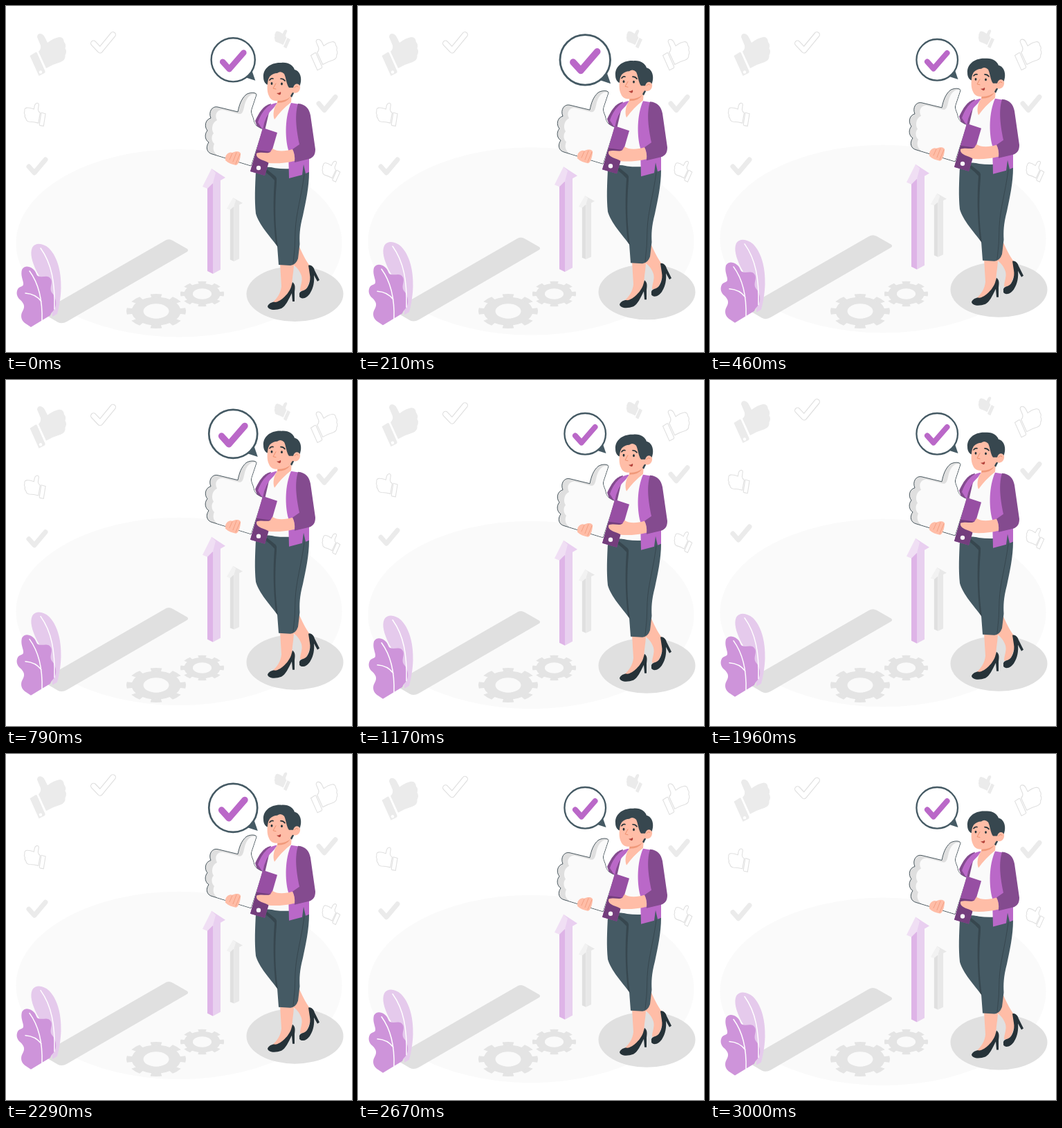
Write an HTML page that moves like this. It is 500 px wide and 500 px high and loops after 3.04 s.

```html
<!DOCTYPE html>
<html lang="en">
<head>
<meta charset="utf-8">
<style>
html, body { margin: 0; height: 100%; overflow: hidden; background: #fff; }
svg { display: block; width: 100vw; height: 100vh; }
.skin { fill: #ffbda7; }
.dark { fill: #263238; }
.slate { fill: #37474f; }
.violet { fill: #ba68c8; }
.plum { fill: #844b8f; }
.line { fill: none; stroke-linecap: round; stroke-linejoin: round; }
.solid { fill: #ebebeb; stroke: none; }
.hollow { fill: #fff; stroke: #e0e0e0; stroke-width: 1.1; }
.lilac { --left: #deb4e7; --right: #e8d0ef; --back: #e9cff0; --front: #f0dff4; }
.grey { --left: #e0e0e0; --right: #e8e8e8; --back: #e8e8e8; --front: #f2f2f2; }
</style>
</head>
<body>
<svg viewBox="0 0 500 500">
  <defs>
    <g id="thumb">
      <path vector-effect="non-scaling-stroke" d="M-15.500-25C-15.500-32-7.500-31-4.500-25L-.5-17Q9-24 16-25Q22.500-26 23.500-18Q27-14 25-9Q28-4 25 1Q26 8 18.500 11Q8 14-2.500 20L-13.500-4Q-9.500-8-10.500-13Z"/>
      <path vector-effect="non-scaling-stroke" d="M-26 2L-18-3Q-16.500-4-15.500-2L-4 24Q-3.500 26-5 27L-13 31Z"/>
    </g>
    <g id="gear" fill="none" stroke="#e4e4e4">
      <circle r="27" stroke-width="17"/>
      <circle r="38.500" stroke-width="9" pathLength="16" stroke-dasharray="1 1" stroke-dashoffset=".5"/>
    </g>
    <g id="arrow">
      <path fill="var(--left)" d="M291 260L299 256V387L291 383Z"/>
      <path fill="var(--right)" d="M299 256L310 250V381L299 387Z"/>
      <path fill="var(--back)" d="M297 235L317 248L310 252L299 256Z"/>
      <path fill="var(--front)" d="M297 235L303 241L299 256L291 264L284 261Z"/>
    </g>
  </defs>

  <g class="bob">
    <ellipse cx="250" cy="342.700" rx="235.500" ry="135.700" fill="#fafafa"/>
  </g>

  <g id="ambient">
    <g class="solid">
      <use href="#thumb" transform="translate(60.500 70)"/>
      <use href="#thumb" transform="translate(399.500 47.500) scale(-.44 .44)"/>
      <circle cx="50" cy="95.500" r="2.200" fill="#fff"/>
    </g>
    <g class="hollow">
      <use href="#thumb" transform="translate(459.500 70) scale(.73)"/>
      <use href="#thumb" transform="translate(470 239) scale(-.49 .49)"/>
      <use href="#thumb" transform="translate(42.500 158.500) rotate(-15) scale(-.57 .57)"/>
    </g>
    <g class="line">
      <path d="M126.500 54L136 64L154.500 41.500" stroke="#e0e0e0" stroke-width="9"/>
      <path d="M126.500 54L136 64L154.500 41.500" stroke="#fff" stroke-width="6.600"/>
      <path d="M33 232L41 241L57 222M452 141L460 150.500L476 131.500" stroke="#ebebeb" stroke-width="7"/>
    </g>
  </g>

  <use href="#gear" transform="translate(217 441) scale(1 .58)"/>
  <use href="#gear" transform="translate(283.500 416) scale(.735 .425)"/>

  <g id="bubble">
    <path fill="#455a64" d="M346 102L354 93L358.500 106Z"/>
    <circle cx="328.200" cy="77.800" r="29.800" fill="#fff" stroke="#455a64" stroke-width="2.300"/>
    <path class="line" d="M314 80.500L323 90.500L342.500 68" stroke="#ba68c8" stroke-width="8"/>
  </g>

  <g class="bob">
    <ellipse cx="417.500" cy="416" rx="70" ry="40" fill="#e0e0e0"/>
    <path fill="#e0e0e0" d="M58 438L229 339.500Q235 335.500 241 339L262 351Q264 353 262 355L88 456Q81 460 75 457L58 447Z"/>

    <!-- plant -->
    <path fill="#e5caec" d="M67 449C69 420 50 395 44 383C38 370 34 358 38 349C43 341 54 343 62 350C76 364 80 388 79.500 408C79 425 76 437 74 445Z"/>
    <path fill="#ce94da" d="M36 464L27 458C21 453 21 446 24 441C28 434 26 430 21 425C16 421 14 415 17 409C20 404 26 407 25 400C24 394 21 389 23 381C27 374 36 376 41 382C45 387 43 390 49 391C55 392 61 388 65 395C68 401 62 407 66 414C70 418 73 425 72 432C71 440 66 441 64 447Z"/>
    <path class="line" d="M50 350C66 372 71 400 70 438M34 383C48 402 53 425 52 455M28 415Q43 416 51 427" stroke="#fff" stroke-width="1.500"/>

    <use href="#arrow" class="lilac"/>
    <use href="#arrow" class="grey" transform="translate(121 134.800) scale(.697 .605)"/>

    <!-- legs and shoes -->
    <path class="skin" d="M424 348C430 362 435 370 440 377L441 392C437 400 437 406 432 411L425 412C425 404 429 398 427 390C424 381 419 376 414 374Z"/>
    <path class="dark" d="M424 418C423 412 429 412 432 410C436 408 441 398 439 388L437 375C441 373 445 378 446 382L453 396L450 398L445 389C446 398 444 408 440 414C436 422 427 425 424 420Z"/>
    <path class="skin" d="M396 372H416C416 385 412 398 414 408L399 429H385C392 422 397 415 398 405Z"/>
    <path class="dark" d="M378 434C380 429 386 427 389 428C398 427 409 415 412 406L414 399C418 402 418 406 417 413V427H414L413 415C408 425 404 434 398 437C390 440 379 440 378 434Z"/>

    <!-- trousers -->
    <path fill="#455a64" d="M361 239C368 229 385 234 409 234V226H438V240C438 262 433 284 429 303C424 322 424 332 424.500 344L422 365Q419 374 411 375L394 374L392 347C382 334 365 315 361 300C359 280 360 260 361 239Z"/>
    <path class="slate" d="M377 236L388 245C392 248 391 250 391 255C388 290 389 320 393 349L390 344C386 310 386 280 388 252Q383 246 375 240Z"/>
    <path class="line" d="M431 243C427 275 419 300 418 325Q418 350 415 372" stroke="#37474f"/>

    <!-- torso -->
    <path fill="#fafafa" d="M388 142L412 138L411 235Q390 236 376 231L366 178Z"/>
    <path class="plum" d="M383 141C371 144 366 154 360 166L364 178L374 180Z"/>
    <path class="violet" d="M392 140C378 141 369 154 364 168L371 179Q374 158 387 147Z"/>
    <path class="skin" d="M392 133L413 126L412 139Q398 150 388 164C385 157 387 146 392 140Z"/>
    <path fill="#f0997a" d="M393 137Q405 137 411 131Q406 140 392 140Z"/>
    <path class="violet" d="M412 140L424 142L426 200L438 218V240L433 242L430 229L428 244L409 249L408 208C403 190 403 160 412 140Z"/>
    <path class="plum" d="M422 141C433 142 438 148 440 158L447 207C447 215 444 219 438 221L417 226Q418 213 414 207L424 200C421 185 416 160 422 141Z"/>

    <!-- head -->
    <path class="slate" d="M372 103C371 90 383 81 398 82C408 81 415 86 417 92C426 94 428 106 425 114C423 121 416 120 416 126L413 132L405 125L380 114C375 114 372 109 372 103Z"/>
    <path class="skin" d="M379 106C377 115 377 124 380 130C383 138 391 138 399 136C405 134 411 132 412 128L414 125C421 128 426 122 425 116C423 111 417 111 415 118L409 118C405 113 405 104 402 98Q397 93 392 97Q386 97 381 102Z"/>
    <g class="dark"><ellipse cx="384" cy="112" rx="1.400" ry="1.900"/><ellipse cx="398.500" cy="112.500" rx="1.400" ry="1.900"/></g>
    <g class="line">
      <path d="M381 107Q383 104 386 105M397 105Q401 105 403 108" stroke="#263238" stroke-width="1.700"/>
      <path d="M390 112L386 119L390 120M417 118Q420 114 422 117" stroke="#ed8f6d"/>
    </g>
    <path fill="#b5443c" d="M391 126Q395 126 397 124Q398 128 395 128.500Z"/>

    <!-- held sign -->
    <path fill="#dfdfdf" stroke="#37474f" stroke-width=".9" d="M371 178C364 176 359 172 358 165C357 159 353 155 355 149L362 128C361 124 351 125 347 128C340 134 337 143 335 153L306 146C298 144 292 153 296 162C288 164 286 174 291 180C286 186 288 194 293 197C288 204 290 212 298 214L354 231Z"/>
    <path fill="#fafafa" d="M371 178C364 176 359 172 357.500 165C356.500 159 352.500 155 354.500 149L361.500 128C352 125 347 135 345 142C343 151 342 157 337 156L313 150C304 150 301 158 305 165C298 168 296 178 300 184C296 188 297 196 301 199C298 206 300 211 305 215.500L354 230.500Z"/>
    <path fill="#974fa3" d="M371 176L392 183L374 245L353 239Z"/>
    <path fill="#743e7d" d="M362 208L384 211L374 245L353 239Z"/>
    <circle cx="365" cy="234" r="3.200" fill="#fafafa"/>

    <!-- hands -->
    <path class="skin" d="M362 213C370 210 377 214 382 211L385 206C392 211 404 210 414 207Q418 215 417 224C405 227 390 228 380 227C372 222 364 222 362 216Z"/>
    <path class="skin" d="M317 220C317 214 323 210 327 212C333 209 340 210 339 215C338 224 335 230 332 230C327 229 321 227 317 223Z"/>
    <path class="line" d="M327 213L323 222M333 212L328 225M338 214L332 228" stroke="#f0997a" stroke-width=".8"/>
  </g>
</svg>
<script>
const LOOP = 3040, START = 42, END = 3000;
const bobbing = document.querySelectorAll('.bob');
const ambient = document.getElementById('ambient');
const bubble = document.getElementById('bubble');

const move = (el, y) => el.setAttribute('transform', `translate(0 ${y})`);
const ease = x => x * x * (3 - 2 * x);

// Linear rise of 10 px and return
function float(t, period) {
  const p = t % period / period;
  return -20 * Math.min(p, 1 - p);
}

// Quick swell, slower release, then rest
function beat(t) {
  const p = t % 750;
  const x = p < 150 ? p / 150 : Math.max(0, (450 - p) / 300);
  return 1 + .3 * ease(x);
}

function draw(time) {
  const t = Math.min(time % LOOP + START, END);
  const y = float(t, 1500) + .56;
  bobbing.forEach(el => move(el, y));
  move(ambient, t < 500 ? 0 : float(t - 500, 3000));
  bubble.setAttribute('transform', `translate(328 77.5) scale(${beat(t)}) translate(-328 -77.5)`);
}

const began = performance.now();
function tick() {
  draw(performance.now() - began);
  requestAnimationFrame(tick);
}
tick();
</script>
</body>
</html>
```
